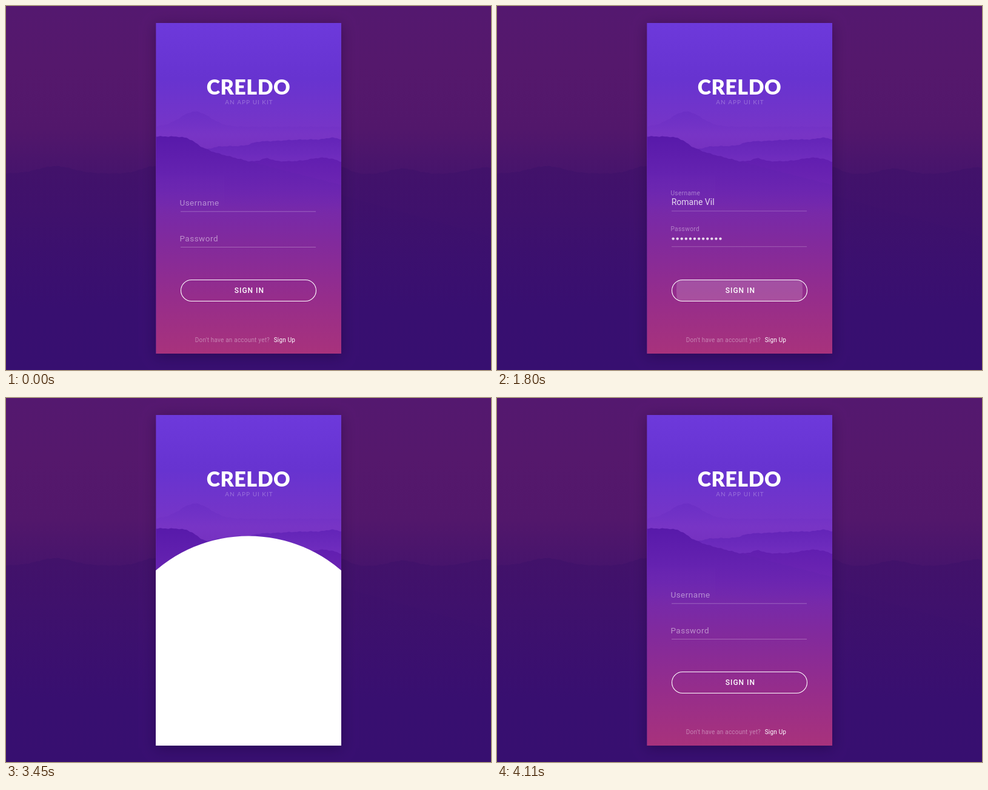
Recreate the animation shown at these times as an HTML page with a canvas. Size 800 by 600 pixels, loop 4.17 s.

```html
<!DOCTYPE html>
<html lang="en">
<head>
<meta charset="utf-8">
<title>Sign in</title>
<style>
html, body { margin: 0; width: 100%; height: 100%; overflow: hidden; background: #380f70; }
canvas { display: block; width: 800px; height: 600px; }
</style>
</head>
<body>
<canvas id="stage" width="800" height="600"></canvas>
<script>
const LOOP = 4170, TICK = 30;
const CARD = { x: 247, y: 28, w: 306, h: 545 };
const MID = 400, BTN_Y = 469, BTN_H = 35;
const FIELD = { x: 288, w: 223 };
const NAME = 'Romane Vil';
const DOTS = 12;
const ctx = document.getElementById('stage').getContext('2d');

const clamp = v => Math.max(0, Math.min(1, v));
const span = (t, from, to) => clamp((t - from) / (to - from));
const ease = p => p < 0.5 ? 4 * p ** 3 : 1 - (2 - 2 * p) ** 3 / 2;
const mix = (a, b, p) => a + (b - a) * p;
const white = a => `rgba(255,255,255,${a})`;
const hump = (x, at, w) => Math.exp(-(((x - at) / w) ** 2));
const step = (x, at, w) => 1 / (1 + Math.exp((at - x) / w));

// Evenly spaced vertical gradient
function fade(c, y0, y1, ...colors) {
  const g = c.createLinearGradient(0, y0, 0, y1);
  colors.forEach((color, i) => g.addColorStop(i / (colors.length - 1), color));
  return g;
}

// Fills the land below a slightly rough skyline
function ridge(c, x0, x1, bottom, skyline, fill) {
  c.beginPath();
  c.moveTo(x0, bottom);
  for (let x = x0; x <= x1; x += 2) {
    const rough = Math.sin(x * 0.71) * 0.35 + Math.sin(x * 0.33 + 2) * 0.4;
    c.lineTo(x, skyline(x) + rough);
  }
  c.lineTo(x1, bottom);
  c.fillStyle = fill;
  c.fill();
}

function label(c, str, x, y, font, color, spacing = 0, align = 'left') {
  c.font = font;
  c.letterSpacing = spacing + 'px';
  c.textAlign = align;
  c.fillStyle = color;
  c.fillText(str, x, y);
}

function drawBackdrop(c) {
  c.fillStyle = fade(c, 0, 600,
    '#54186f', '#55186c', '#52176b', '#43136c', '#3c106e', '#380f70', '#370f70');
  c.fillRect(0, 0, 800, 600);
  const land = fade(c, 260, 430, '#42126a', '#3f116c', 'rgba(58,16,110,0)');
  ridge(c, 0, 248, 430, x => 276 - 12 * hump(x, 82, 40) - 12 * hump(x, 245, 30), land);
  ridge(c, 552, 800, 430,
    x => 277 - 12 * hump(x, 550, 22) - 9 * hump(x, 655, 32) - 11 * hump(x, 795, 45), land);
  ridge(c, 552, 800, 450, x => 311 + (x - 552) * 0.28,
    fade(c, 310, 450, '#3f116b', 'rgba(57,15,110,0)'));
}

function drawLandscape(c) {
  c.fillStyle = fade(c, 28, 573,
    '#6d39db', '#6733d0', '#7835c6', '#7029b2', '#822a9c', '#962d8b', '#a8327c');
  c.fillRect(CARD.x, CARD.y, CARD.w, CARD.h);

  const left = CARD.x, right = CARD.x + CARD.w + 1;
  ridge(c, left, right, 225, x => 199 - 25 * hump(x, 312, 35),
    fade(c, 172, 215, 'rgba(98,38,190,0.4)', 'rgba(98,38,190,0)'));
  ridge(c, 326, right, 290,
    x => 238 - 7 * step(x, 338, 6) - 8 * step(x, 404, 6) - 3 * step(x, 460, 12) - 3 * hump(x, 537, 12),
    fade(c, 217, 275, '#6324b8', '#6d2bbd', 'rgba(116,47,190,0)'));
  ridge(c, 360, right, 345,
    x => 256 - 5 * hump(x, 430, 12) - 6 * hump(x, 522, 28) + 3 * step(x, 548, 4),
    fade(c, 249, 345, '#611eb0', '#6d25b2', 'rgba(120,40,168,0)'));
  ridge(c, left, right, 340,
    x => 215 + 23 * step(x, 314, 8) + 0.255 * Math.max(0, x - 330),
    fade(c, 213, 340, '#5719aa', '#6522b0', 'rgba(112,40,174,0)'));
}

function drawCard(c) {
  c.save();
  c.shadowColor = 'rgba(20,0,45,0.38)';
  c.shadowBlur = 20;
  c.shadowOffsetY = 4;
  c.fillStyle = '#6a2bb0';
  c.fillRect(CARD.x + 0.5, CARD.y, CARD.w - 0.5, CARD.h);
  c.restore();

  c.save();
  c.beginPath();
  c.rect(CARD.x + 0.5, CARD.y, CARD.w - 0.5, CARD.h);
  c.clip();
  drawLandscape(c);
  c.restore();

  label(c, 'CRELDO', 400, 146, '900 34px Lato, sans-serif', '#fff', 0.5, 'center');
  label(c, 'AN APP UI KIT', 401, 162, '10px Lato, sans-serif', white(0.3), 1, 'center');
  const small = '10px Roboto, sans-serif';
  label(c, "Don't have an account yet?", 311.8, 553.6, small, white(0.4), 0.2);
  label(c, 'Sign Up', 441.7, 553.6, small, '#fff', 0.2);
}

const scene = document.createElement('canvas');
scene.width = 800;
scene.height = 600;
drawBackdrop(scene.getContext('2d'));
drawCard(scene.getContext('2d'));

function floatLabel(str, y, rise) {
  const size = 1 - 0.25 * rise;
  ctx.save();
  ctx.translate(286.4, y - 16 * rise);
  ctx.scale(size, size);
  label(ctx, str, 0, 0, '13.5px Roboto, sans-serif', white(0.48), 0.5);
  ctx.restore();
}

function underline(y, glow) {
  ctx.fillStyle = white(0.28);
  ctx.fillRect(FIELD.x, y, FIELD.w, 1);
  ctx.fillStyle = white(glow);
  ctx.fillRect(FIELD.x, y, FIELD.w, 1.8);
}

// The label floats up and the line lights between focus and blur
function drawField(t, str, y, focus, blur) {
  floatLabel(str, y, ease(span(t, focus, focus + 300)));
  underline(y + 9, span(t, focus, focus + 120) * (1 - span(t, blur, blur + 120)));
}

function drawForm(t) {
  const out = ease(span(t, 1670, 2070));
  if (out >= 1) return;
  ctx.save();
  ctx.globalAlpha = 1 - out;
  ctx.translate(0, -6 * out);
  drawField(t, 'Username', 329.3, 0, 600);
  drawField(t, 'Password', 388, 590, 1440);

  const typed = NAME.slice(0, Math.round(NAME.length * span(t, 270, 630)));
  label(ctx, typed, 287.7, 329.2, '14px Roboto, sans-serif', white(0.95));
  const count = Math.floor(DOTS * span(t, 880, 1440));
  for (let i = 0; i < count; i++) {
    ctx.beginPath();
    ctx.arc(290.6 + i * 7.08, 384.4, 2.2, 0, 7);
    ctx.fill();
  }
  ctx.restore();
}

function pill(w) {
  ctx.beginPath();
  ctx.roundRect(MID - w / 2, BTN_Y - BTN_H / 2, w, BTN_H, BTN_H / 2);
}

function drawButton(t) {
  const ring = 1 - span(t, 2160, 2280);
  if (ring <= 0) return;
  const w = mix(FIELD.w, BTN_H, ease(span(t, 1860, 2160)));
  ctx.save();
  pill(w);
  ctx.clip();
  ctx.beginPath();
  ctx.arc(MID, BTN_Y, 114.5 * span(t, 1500, 1830), 0, 7);
  ctx.fillStyle = white(0.17 * (1 - span(t, 1860, 2130)));
  ctx.fill();
  ctx.restore();

  pill(w);
  ctx.lineWidth = 1.1;
  ctx.strokeStyle = white(ring);
  ctx.stroke();
  label(ctx, 'SIGN IN', 376.8, 472.8, '500 12px Roboto, sans-serif',
    white(1 - span(t, 1830, 1950)), 1);
}

function drawSpinner(t) {
  const show = span(t, 2160, 2280);
  if (show <= 0) return;
  const head = (t - 2080) / 800 * 2 * Math.PI;
  const tail = head - Math.PI;
  const g = ctx.createConicGradient(tail, MID, BTN_Y);
  g.addColorStop(0, white(0));
  g.addColorStop(0.5, white(0.9 * show));
  ctx.beginPath();
  ctx.arc(MID, BTN_Y, BTN_H / 2, tail, head);
  ctx.lineWidth = 1.2;
  ctx.strokeStyle = g;
  ctx.stroke();
}

// A white disc covers the card, then shrinks and fades away
function drawFlood(t) {
  const grow = span(t, 3270, 3570);
  const leave = span(t, 3870, 4110);
  if (grow <= 0 || leave >= 1) return;
  const r = leave > 0 ? mix(475, 18, leave) : 470 * grow ** 1.36;
  ctx.save();
  ctx.beginPath();
  ctx.rect(CARD.x, CARD.y, CARD.w, CARD.h);
  ctx.clip();
  ctx.beginPath();
  ctx.arc(MID, mix(BTN_Y, 455, r / 470), r, 0, 7);
  ctx.fillStyle = white(1 - leave ** 1.6);
  ctx.fill();
  ctx.restore();
}

function draw(now) {
  const t = Math.floor((now % LOOP) / TICK) * TICK;
  // The form is reset behind the white cover
  const form = t >= 3600 ? 0 : t;
  ctx.drawImage(scene, 0, 0);
  drawForm(form);
  drawButton(form);
  drawSpinner(form);
  drawFlood(t);
}

let start = null;
function frame(now) {
  if (start === null) start = now;
  draw(now - start);
  requestAnimationFrame(frame);
}
draw(0);
requestAnimationFrame(frame);
</script>
</body>
</html>
```
